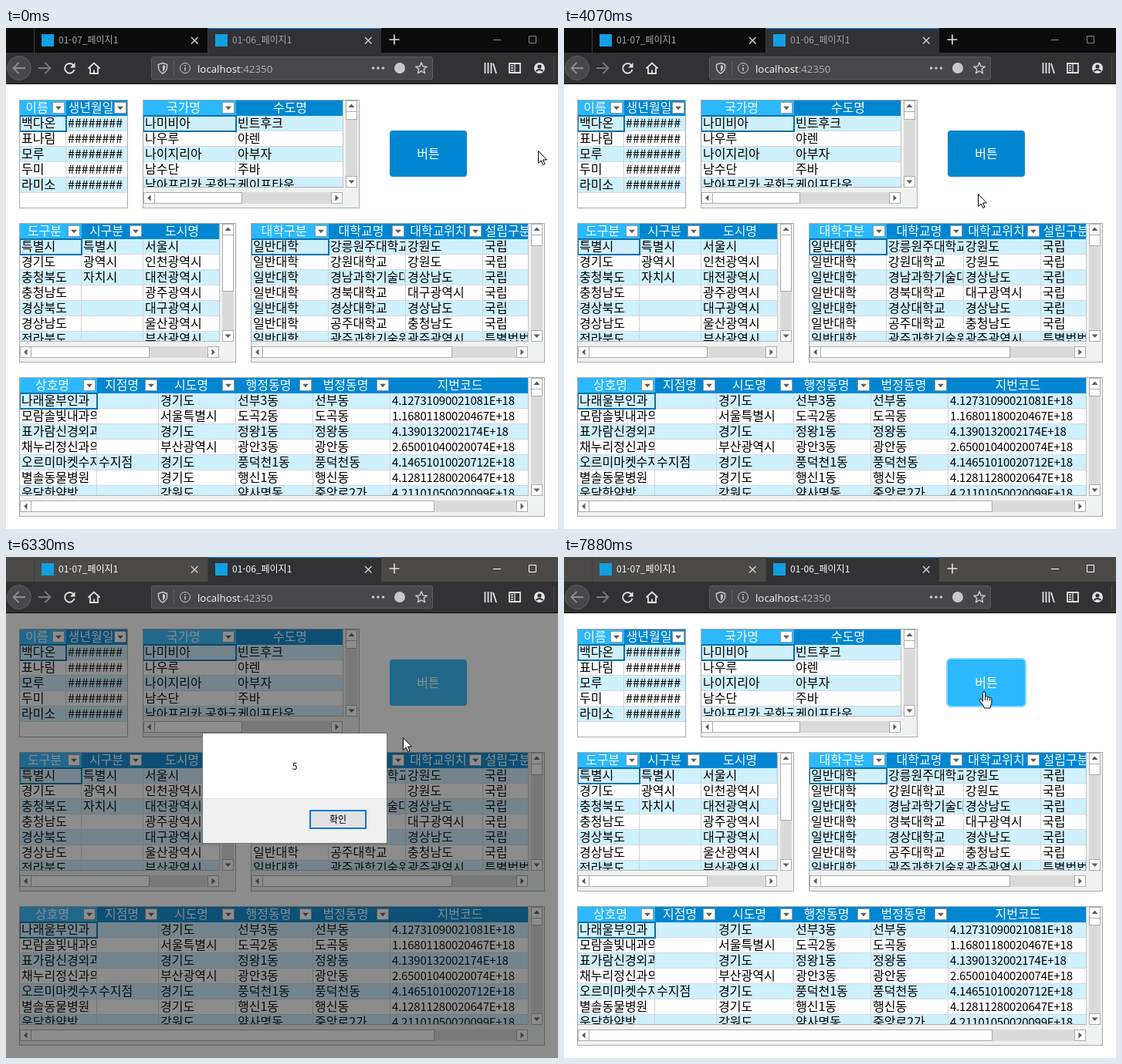
Write an HTML page that moves like this. It is 715 px wide and 650 px high and loops after 8 s.

```html
<!DOCTYPE html>
<html lang="ko">
<head>
<meta charset="utf-8">
<title>01-06_페이지1</title>
<style>
  html, body { margin: 0; width: 100%; height: 100%; overflow: hidden; background: #fff; }
  #stage { display: block; width: 715px; height: 650px; cursor: default; }
  text { font: 16px "Noto Sans CJK KR", "Noto Sans CJK JP", "Noto Sans", sans-serif; white-space: pre; }
  .small { font-size: 12px; }
  .num { font-size: 15px; letter-spacing: -.2px; }
  .url { font: 13.3px "Open Sans", "Noto Sans", sans-serif; }
  .mid { text-anchor: middle; }
</style>
</head>
<body>
<svg id="stage" viewBox="0 0 715 650"></svg>
<script>
const NS = 'http://www.w3.org/2000/svg';
const stage = document.getElementById('stage');

function add(parent, tag, attrs = {}, content) {
  const node = document.createElementNS(NS, tag);
  for (const key in attrs) node.setAttribute(key, attrs[key]);
  if (content !== undefined) node.textContent = content;
  parent.appendChild(node);
  return node;
}
const group = parent => add(parent, 'g');
const fillRect = (g, x, y, width, height, fill) => add(g, 'rect', { x, y, width, height, fill });
const box = (g, x, y, w, h, fill, stroke, rx = 0) =>
  add(g, 'rect', { x: x + .5, y: y + .5, width: w - 1, height: h - 1, fill, stroke, rx });
const disc = (g, cx, cy, r, fill) => add(g, 'circle', { cx, cy, r, fill });
const label = (g, x, y, str, fill = '#000', cls = '') =>
  add(g, 'text', { x, y, fill, class: cls }, str);
const line = (g, d, stroke, width = 1.5) =>
  add(g, 'path', { d, fill: 'none', stroke, 'stroke-width': width });
const clip = (g, x, y, width, height) => add(g, 'svg', { x, y, width, height, overflow: 'hidden' });
const show = (node, on) => node.setAttribute('visibility', on ? 'visible' : 'hidden');

const BLUE = '#0086d1', LIGHT = '#2bb8fe', BAND = '#cff0ff', EDGE = '#ababab';
const ICON = '#e2e2e4', SOFT = '#c8c8ca';

function tri(g, x, y, angle) {
  add(g, 'path', { d: 'M-4 -2H4L0 2.4Z', fill: '#5c5c5c', transform: `translate(${x} ${y}) rotate(${angle})` });
}

// Browser frame
const chrome = group(stage);
const strip = fillRect(chrome, 0, 0, 715, 32, '#0c0c0d');
fillRect(chrome, 36, 0, 1, 32, '#3f3f40');
fillRect(chrome, 261, 0, 1, 32, '#3f3f40');
fillRect(chrome, 262, 0, 224, 32, '#323234');
fillRect(chrome, 262, 0, 224, 1, '#0a84ff');
fillRect(chrome, 0, 32, 715, 40, '#323234');
fillRect(chrome, 0, 72, 715, 1, '#0c0c0d');

const titles = [['01-07_페이지1', 46], ['01-06_페이지1', 271]].map(([name, x]) => {
  fillRect(chrome, x, 8, 16, 16, '#129fe0');
  line(chrome, `M${x + 194} 12l8.5 8.5m0 -8.5l-8.5 8.5`, '#d4d4d6', 1.4);
  return label(chrome, x + 22, 20, name, '#aaa', 'small');
});
line(chrome, 'M503 8.5v13M496.5 15h13', ICON, 1.6);
const winButtons = line(chrome, 'M631 15.5h10M677.5 10.5h9v9h-9z', '#888', 1);

function toolbar(g) {
  disc(g, 17, 52, 15.5, '#48484a').setAttribute('stroke', '#5e5e60');
  line(g, 'M25 52H10M16.5 45L9.5 52l7 7', '#8e8e90', 1.8);
  line(g, 'M42 52h15M50.5 45l7 7l-7 7', '#7b7b7d', 1.8);
  line(g, 'M87.5 48.5A6.3 6.3 0 1 0 88.5 54', ICON, 1.9);
  add(g, 'path', { d: 'M89.5 45v6.5h-6.5z', fill: ICON });
  line(g, 'M106.5 52.5L114 45.5l7.5 7M109 51.5v7.5h10v-7.5M114 59v-4.5', ICON, 1.8);

  box(g, 188, 37, 365, 30, '#474749', '#5c5c5e', 2);
  line(g, 'M203 45.5l5.5 1.7v4.3q-.5 5 -5.5 7.5q-5 -2.5 -5.5 -7.5v-4.3z', SOFT);
  add(g, 'path', { d: 'M203 48v8.5q3 -2 3 -5.5v-2z', fill: SOFT });
  fillRect(g, 217, 43, 1, 18, '#606062');
  disc(g, 232, 52, 6.5, 'none').setAttribute('stroke', SOFT);
  line(g, 'M232 51v4.5M232 48v1.5', SOFT);
  const url = label(g, 248, 57.5, '', '#f9f9fa', 'url');
  add(url, 'tspan', {}, 'localhost');
  add(url, 'tspan', { fill: '#b1b1b3' }, ':42350');
  for (let i = -1; i <= 1; i++) disc(g, 482 + i * 6.5, 52, 1.8, SOFT);
  disc(g, 510, 52, 7, SOFT);

  const star = Array.from({ length: 10 }, (_, i) => {
    const a = i * Math.PI / 5 - Math.PI / 2, r = i % 2 ? 3.4 : 7.6;
    return [538 + r * Math.cos(a), 52.5 + r * Math.sin(a)];
  });
  add(g, 'polygon', { points: star.join(' '), fill: 'none', stroke: SOFT, 'stroke-width': 1.5, 'stroke-linejoin': 'round' });

  line(g, 'M620.5 45v14M624.5 45v14M628.5 45v14M631 46l4 13', ICON, 1.8);
  line(g, 'M652 46h14v12h-14z', ICON, 1.8);
  line(g, 'M659 46v12M654 49h3M654 52h3M654 55h3', ICON, 1.3);
  disc(g, 691, 52, 7, ICON);
  disc(g, 691, 50, 2.6, '#323234');
  line(g, 'M686.5 56q4.5 -4 9 0', '#323234', 1.8);
  fillRect(g, 709, 37, 1, 30, '#4c4c4e');
}
toolbar(chrome);

// Page
const page = group(stage);
fillRect(page, 0, 73, 715, 577, '#fff');
const ROW = 20;

function scrollbars(x, y, w, h, vThumb, hThumb) {
  const part = (px, py, pw, ph) => box(page, px, py, pw, ph, '#fff', EDGE);
  const vx = x + w - 18, vEnd = y + h - 27, hy = y + h - 21, hEnd = x + w - 22;
  fillRect(page, vx, y + 1, 15, vEnd - y - 1, '#dadada');
  part(vx, y + 1, 15, 15);
  part(vx, y + 15, 15, vThumb);
  part(vx, vEnd - 15, 15, 15);
  tri(page, vx + 7.5, y + 8, 180);
  tri(page, vx + 7.5, vEnd - 7.5, 0);
  fillRect(page, x + 1, hy, hEnd - x - 1, 15, '#dadada');
  part(x + 1, hy, 15, 15);
  part(x + 15, hy, hThumb, 15);
  part(hEnd - 15, hy, 15, 15);
  tri(page, x + 8.5, hy + 7.5, 90);
  tri(page, hEnd - 7.5, hy + 7.5, -90);
}

// A heading ending in * has no filter button
function sheet(x, y, w, h, widths, heads, lines, thumbs) {
  box(page, x, y, w, h, thumbs ? '#f0f2f2' : '#fff', EDGE);
  const view = clip(page, x + 1, y + 1, w - (thumbs ? 22 : 2), h - (thumbs ? 28 : 2));
  fillRect(view, 0, 0, w, h, '#fff');
  const rows = lines.map(s => s.split('|'));
  rows.forEach((_, r) => {
    const top = ROW * (r + 1);
    if (r % 2 === 0) fillRect(view, 0, top, w, ROW, BAND);
    fillRect(view, 0, top + ROW - 1, w, 1, '#d3dade');
  });
  let left = 0;
  heads.split('|').forEach((head, c) => {
    const width = widths[c], filter = !head.endsWith('*');
    const cell = r => clip(view, left, ROW * r, width, ROW);
    fillRect(view, left, 0, width, ROW, c ? BLUE : LIGHT);
    label(cell(0), (width - (filter ? 16 : 0)) / 2, 15, head.replace('*', ''), '#f4fbff', 'mid');
    if (filter) {
      box(view, left + width - 18, 2, 16, 15, '#fff', '#8a9aa5');
      tri(view, left + width - 10, 9.8, 0);
    }
    rows.forEach((row, r) =>
      label(cell(r + 1), 2, 15, row[c], '#000', row[c].includes('E+') ? 'num' : ''));
    fillRect(view, left + width - 1, ROW, 1, rows.length * ROW, '#d3d3d3');
    left += width;
  });
  add(view, 'rect', { x: 0, y: ROW, width: widths[0], height: ROW, fill: 'none', stroke: '#0a70aa', 'stroke-width': 2 });
  if (thumbs) {
    fillRect(page, x + w - 22, y + 1, 1, h - 28, '#c4c4c4');
    fillRect(page, x + 1, y + h - 28, w - 22, 1, '#b4b4b4');
    scrollbars(x, y, w, h, ...thumbs);
  }
}

sheet(17, 93, 141, 141, [60, 80], '이름|생년월일',
  ['백다온', '표나림', '모루', '두미', '라미소'].map(name => name + '|########'));

sheet(177, 93, 281, 141, [120, 140], '국가명|수도명*',
  ['나미비아|빈트후크', '나우루|야렌', '나이지리아|아부자', '남수단|주바', '남아프리카 공화국|케이프타운'], [11, 114]);

sheet(17, 253, 281, 181, [80, 80, 100], '도구분|시구분|도시명*',
  ['특별시|특별시|서울시', '경기도|광역시|인천광역시', '충청북도|자치시|대전광역시', '충청남도||광주광역시',
   '경상북도||대구광역시', '경상남도||울산광역시', '전라북도||부산광역시'], [74, 154]);

sheet(317, 253, 381, 181, [100, 100, 100, 80], '대학구분|대학교명|대학교위치|설립구분',
  ['강릉원주대학교|강원도|국립', '강원대학교|강원도|국립', '경남과학기술대학교|경상남도|국립', '경북대학교|대구광역시|국립',
   '경상대학교|경상남도|국립', '공주대학교|충청남도|국립', '광주과학기술원|광주광역시|특별법법인'].map(s => '일반대학|' + s), [15, 246]);

sheet(17, 453, 681, 181, [100, 80, 100, 100, 100, 180], '상호명|지점명|시도명|행정동명|법정동명|지번코드*',
  ['나래울부인과||경기도|선부3동|선부동|4.12731090021081E+18',
   '모람솔빛내과의||서울특별시|도곡2동|도곡동|1.16801180020467E+18',
   '표가람신경외과||경기도|정왕1동|정왕동|4.1390132002174E+18',
   '채누리정신과의||부산광역시|광안3동|광안동|2.65001040020074E+18',
   '오르미마켓수지|수지점|경기도|풍덕천1동|풍덕천동|4.14651010020712E+18',
   '별솔동물병원||경기도|행신1동|행신동|4.12811280020647E+18',
   '운담한약방||강원도|약사명동|중앙로2가|4.21101050020099E+18'], [10, 523]);

const ring = add(page, 'rect', { x: 496, y: 132, width: 102, height: 62, rx: 5, fill: 'none', stroke: '#86d8ff', 'stroke-width': 2 });
const button = add(page, 'rect', { x: 497, y: 133, width: 100, height: 60, rx: 4 });
label(page, 547, 169, '버튼', '#fff', 'mid');

// Message box
const modal = group(stage);
fillRect(modal, 0, 73, 715, 577, 'rgba(26,26,26,.5)');
box(modal, 254, 228, 240, 144, '#fff', 'rgba(60,60,60,.6)');
fillRect(modal, 255, 313, 238, 58, '#f0f0f0');
fillRect(modal, 255, 313, 238, 1, '#e0e0e0');
label(modal, 374, 276, '5', '#000', 'small mid');
const okIdle = add(modal, 'rect', { x: 394, y: 329, width: 72, height: 23, fill: '#e1e1e1', stroke: '#0078d7', 'stroke-width': 2 });
const okHover = box(modal, 393, 328, 74, 25, '#cce4f7', '#0054a0');
label(modal, 430, 345, '확인', '#000', 'small mid');

// Pointer, drawn with its hot spot at 0,0
const pointer = group(stage);
const halo = disc(pointer, 0, 1, 12, 'rgba(255,255,0,.45)');
const ink = { fill: '#fff', stroke: '#000', 'stroke-linejoin': 'round' };
const arrow = add(pointer, 'path', { d: 'M.5 .5V16.5L4.2 13L6.7 18.5L9 17.5L6.6 12H11.5Z', ...ink });
const hand = add(pointer, 'g', { transform: 'translate(-7 -.5)' });
add(hand, 'path', { d: 'M5.5 13V2a1.6 1.6 0 0 1 3.2 0V7.5a1.5 1.5 0 0 1 3 .4a1.5 1.5 0 0 1 2.8 .6a1.4 1.4 0 0 1 2.4 .8V14c0 3 -1.6 4 -1.8 7.5H7.2C7 18 3.5 15.5 1 11.6c-.8 -1.6 1.2 -2.8 2.6 -1.3z', ...ink });
line(hand, 'M8.7 7.5v4M11.7 8.2v3.5M14.5 9v3', '#000', 1);

// Pointer strokes: first and last step in ms, where it ends, how far the middle bows out
const strokes = [
  { from: 360, until: 360, to: [688, 156] },
  { from: 590, until: 680, to: [692, 151] },
  { from: 1060, until: 1460, to: [105, 175], bow: [0, 32] },
  { from: 1780, until: 1930, to: [284, 164], bow: [40, 0] },
  { from: 2250, until: 2390, to: [171, 327] },
  { from: 2710, until: 2790, to: [388, 327] },
  { from: 3080, until: 3240, to: [398, 495], bow: [92, 0] },
  { from: 3620, until: 4070, to: [536, 215] },
  { from: 4620, until: 4850, to: [551, 183] },
  { from: 6180, until: 6490, to: [430, 352] },
  { from: 6640, until: 6720, to: [424, 344] },
  { from: 7410, until: 7880, to: [544, 175] }
];
const HOME = [689, 159], STEP = 77, LOOP = 8000;
const CLICK = 5080, OPEN = 5160, CONFIRM = 7190, RELEASE = 7250, CLOSE = 7330;

function ease(u) {
  const v = u ** 1.1;
  return v * v * (3 - 2 * v);
}

function pointerAt(t) {
  const i = strokes.findLastIndex(s => s.from <= t);
  if (i < 0) return HOME;
  const { from, until, to, bow = [0, 0] } = strokes[i];
  const start = i ? strokes[i - 1].to : HOME;
  const gaps = Math.round((until - from) / STEP);
  const done = t >= until ? gaps : Math.floor((t - from) / (until - from) * gaps + .05);
  const p = ease((done + 1) / (gaps + 1));
  return to.map((end, k) => Math.round(start[k] + (end - start[k]) * p + bow[k] * 4 * p * (1 - p)));
}

const within = (t, a, b) => t >= a && t < b;

function draw(t) {
  const [x, y] = pointerAt(t);
  const awake = t >= CLICK;
  const open = within(t, OPEN, CLOSE);
  const overButton = within(x, 497, 597) && within(y, 133, 193);
  const overOk = open && within(x, 393, 467) && within(y, 328, 353);

  strip.setAttribute('fill', awake ? '#4c4a48' : '#0c0c0d');
  titles.forEach(title => title.setAttribute('fill', awake ? '#f9f9fa' : '#a6a6a8'));
  winButtons.setAttribute('stroke', awake ? '#fff' : '#888');

  button.setAttribute('fill', overButton || open ? LIGHT : BLUE);
  show(ring, within(t, OPEN, OPEN + 110) || t >= CLOSE);
  show(modal, open);
  show(okIdle, open && !overOk);
  show(okHover, overOk);

  const pointing = (overButton && !open) || within(t, RELEASE, CLOSE);
  pointer.setAttribute('transform', `translate(${x} ${y})`);
  show(arrow, !pointing);
  show(hand, pointing);
  show(halo, within(t, CLICK, OPEN) || within(t, CONFIRM, RELEASE));
}

const begin = performance.now();
function tick() {
  draw((performance.now() - begin) % LOOP);
  requestAnimationFrame(tick);
}
tick();
</script>
</body>
</html>
```
